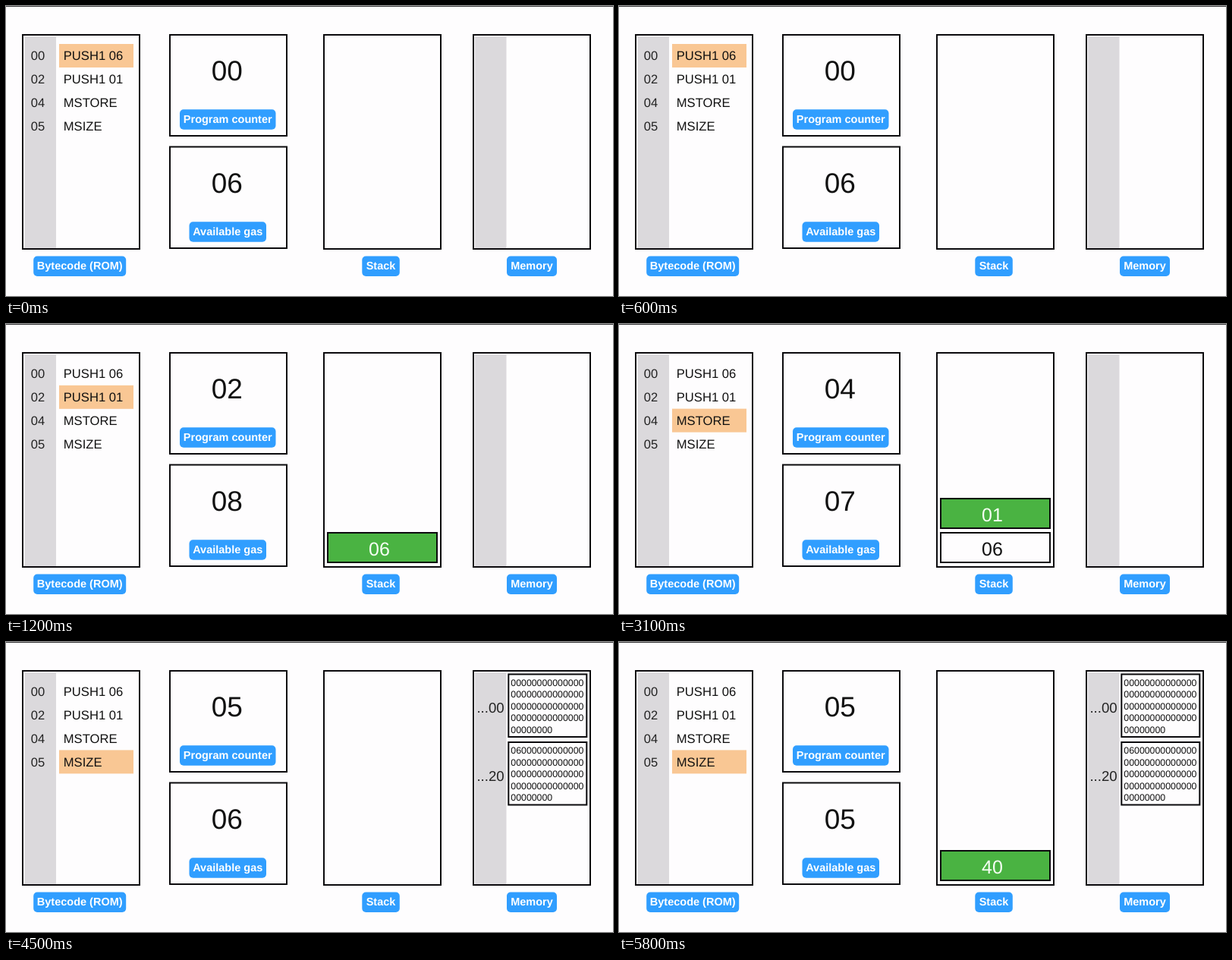
An HTML page for the animation above (8500 ms loop, 800x382 px).

```html
<!DOCTYPE html>
<html lang="en">
<head>
<meta charset="utf-8">
<title>Bytecode execution</title>
<style>
html, body { margin: 0; width: 100%; height: 100%; overflow: hidden; background: #fefdfe; }
svg { display: block; width: 100%; height: 100%; }
text { font-family: "Liberation Sans", Arial, sans-serif; text-rendering: geometricPrecision; }
</style>
</head>
<body>
<svg id="stage" viewBox="0 0 800 382"></svg>
<script>
const LOOP = 8500;
const STATES = [
  { at: 0, row: 0, pc: '00', gas: '06', stack: [], memory: [] },
  { at: 1000, row: 1, pc: '02', gas: '08', stack: ['06'], memory: [] },
  { at: 3100, row: 2, pc: '04', gas: '07', stack: ['06', '01'], memory: [] },
  { at: 4500, row: 3, pc: '05', gas: '06', stack: [], memory: ['00', '06'] },
  { at: 5800, row: 3, pc: '05', gas: '05', stack: ['40'], memory: ['00', '06'] }
];
const CODE = [['00', 'PUSH1 06'], ['02', 'PUSH1 01'], ['04', 'MSTORE'], ['05', 'MSIZE']];

const rect = (x, y, w, h, fill, extra = '') =>
  `<rect x="${x}" y="${y}" width="${w}" height="${h}" fill="${fill}" ${extra}/>`;
const box = (x, y, w, h, fill = 'none') =>
  rect(x + 1, y + 1, w - 2, h - 2, fill, 'stroke="#0b0a0d" stroke-width="2"');
const text = (s, x, y, size, fill = '#111', anchor = 'middle', weight = 400) =>
  `<text x="${x}" y="${y}" font-size="${size}" fill="${fill}" text-anchor="${anchor}" font-weight="${weight}">${s}</text>`;
const label = (s, x, y, w) =>
  rect(x, y, w, 26.5, '#309eff', 'rx="5"') +
  text(s, x + w / 2, y + 17.5, 14.5, '#fff', 'middle', 700);

function codePanel(row) {
  const lines = CODE.map(([address, op], i) => {
    const y = 71.3 + i * 30.8;
    return text(address, 42, y, 16.5, '#222') + text(op, 75.8, y, 16.6, '#111', 'start');
  });
  return rect(25, 40, 41, 279, '#dbd9dc') +
    rect(70, 50 + row * 30.8, 98, 31, '#f9c794') +
    lines.join('') + box(21, 37, 156, 284);
}

function stackItem(value, i, all) {
  const y = 274 - i * 45;
  const top = i === all.length - 1;
  return box(423, y, 146, 41, top ? '#4ab342' : '#fefdfe') +
    text(value, 492, y + 31, 25, top ? '#f6fff4' : '#111');
}

function memoryWord(start, i) {
  const y = 41.5 + i * 89.5;
  const digits = start.padEnd(64, '0').match(/.{1,14}/g);
  return box(661.3, y, 105, 84.5) +
    text(['...00', '...20'][i], 638.5, y + 51.5, 18.6, '#222') +
    digits.map((s, n) => text(s, 665.3, y + 16 + n * 15.5, 12.35, '#111', 'start')).join('');
}

function scene(s) {
  return rect(0, 0, 800, 382, '#fefdfe') + rect(0, 0, 800, 1, '#3a393b') +
    codePanel(s.row) +
    box(215, 37, 156, 135) + text(s.pc, 291.3, 98.4, 37) +
    box(215, 184.5, 156, 135.5) + text(s.gas, 291.3, 246.4, 37) +
    box(418, 37, 156, 284) + s.stack.map(stackItem).join('') +
    rect(618, 40, 41.5, 279, '#dbd9dc') + box(615, 37, 156, 284) +
    s.memory.map(memoryWord).join('') +
    label('Bytecode (ROM)', 36.2, 329.5, 122) +
    label('Program counter', 229, 136.3, 126.5) +
    label('Available gas', 241.5, 284.3, 101.5) +
    label('Stack', 469.3, 329.5, 49.5) +
    label('Memory', 660, 329.5, 66);
}

const stage = document.getElementById('stage');
const startTime = performance.now();
let shown;

function frame() {
  const t = (performance.now() - startTime) % LOOP;
  const state = STATES.findLast(s => s.at <= t);
  if (state !== shown) stage.innerHTML = scene(shown = state);
  requestAnimationFrame(frame);
}
frame();
</script>
</body>
</html>
```
